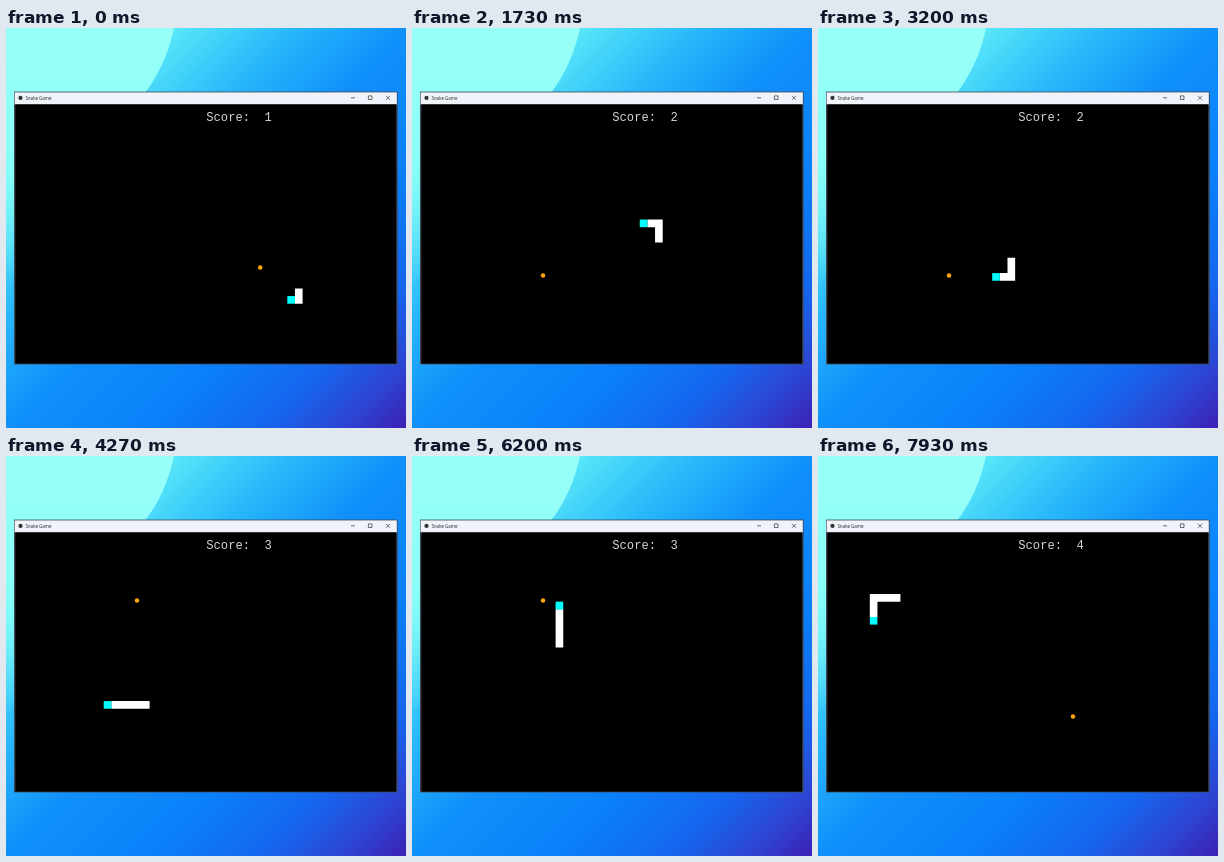
These frames come from a looping animation (400 px wide and 400 px high, 8 s). An HTML page:

```html
<!DOCTYPE html>
<html lang="en">
<head>
<meta charset="utf-8">
<title>Snake Game</title>
<style>
  html, body { margin: 0; width: 100%; height: 100%; overflow: hidden; }
  svg { display: block; width: 100vw; height: 100vh; }
  .title { font: 4.5px "Open Sans", "Noto Sans", sans-serif; fill: #222; }
  .score { font: 12.15px "Courier New", "Liberation Mono", monospace; fill: #d4d4d4; white-space: pre; }
  .controls { fill: none; stroke: #333; stroke-width: .7; }
</style>
</head>
<body>
<svg viewBox="0 0 400 400">
  <defs>
    <linearGradient id="sky" gradientUnits="userSpaceOnUse" x2="400" y2="400">
      <stop offset="0" stop-color="#8ffff8"/>
      <stop offset=".2" stop-color="#5ceaf8"/>
      <stop offset=".36" stop-color="#28b8fa"/>
      <stop offset=".5" stop-color="#1090fa"/>
      <stop offset=".68" stop-color="#0a80fa"/>
      <stop offset=".82" stop-color="#1566ee"/>
      <stop offset=".92" stop-color="#2d44d2"/>
      <stop offset="1" stop-color="#3c20b4"/>
    </linearGradient>
    <linearGradient id="glow" gradientUnits="userSpaceOnUse" x2="0" y2="260">
      <stop offset="0" stop-color="#98fff8"/>
      <stop offset=".5" stop-color="#8afff8"/>
      <stop offset="1" stop-color="#8afff8" stop-opacity="0"/>
    </linearGradient>
  </defs>

  <rect width="400" height="400" fill="url(#sky)"/>
  <path d="M0 0H168Q160 38 138 66L0 260Z" fill="url(#glow)"/>

  <rect x="8" y="63.6" width="383.6" height="272.8" fill="#3c4450"/>
  <rect x="8.6" y="64.4" width="382.2" height="12" fill="#f0f3fa"/>
  <rect x="9.4" y="76.4" width="380.8" height="259.2"/>
  <circle cx="14.5" cy="69.9" r="2.1" fill="#333"/>
  <text class="title" x="19.4" y="71.6">Snake Game</text>
  <path class="controls" d="M345 69.8h4M362.4 67.9h3.6v3.6h-3.6zM380 67.8l4 4m0-4l-4 4"/>

  <text class="score" id="score" x="200.3" y="93"></text>
  <circle id="food" r="2.25" fill="#ffa50a"/>
  <path id="body" fill="#fff"/>
  <path id="head" fill="#0ff"/>
</svg>
<script>
  const LOOP = 8000, FRAME = 200 / 3;
  const STEP = 104.5, LEAD = 76;
  const CELL = 7.65, LEFT = 51.8, TOP = 138;
  const TURNS = "L5 U10 L7 D7 L12 U6 R6 U8 L12 D3";
  const DIRS = { L: [-1, 0], R: [1, 0], U: [0, -1], D: [0, 1] };

  // Each meal: the move on which it is eaten, then the next food position.
  const MEALS = [
    { move: 0, food: [254.2, 239.4] },
    { move: 9, food: [131, 247.4] },
    { move: 37, food: [131, 144.6] },
    { move: 63, food: [255, 260.5] }
  ];

  const trail = [[31, 16], [31, 17], [30, 17]];
  const START = trail.length - 1;
  for (const turn of TURNS.split(" ")) {
    const [dx, dy] = DIRS[turn[0]];
    for (let i = 0; i < +turn.slice(1); i++) {
      const [x, y] = trail[trail.length - 1];
      trail.push([x + dx, y + dy]);
    }
  }

  const [score, food, body, head] =
    ["score", "food", "body", "head"].map(id => document.getElementById(id));

  function cellsPath(cells) {
    return cells.map(([x, y]) =>
      `M${LEFT + x * CELL} ${TOP + y * CELL}h${CELL}v${CELL}h${-CELL}z`).join("");
  }

  function draw(time) {
    const frame = Math.floor((time % LOOP + 4) / FRAME) % 120;
    const move = Math.min(Math.floor((frame * FRAME + LEAD) / STEP), trail.length - 1 - START);
    const eaten = MEALS.filter(meal => meal.move <= move);
    const meal = eaten[eaten.length - 1];

    // A new segment sits under the tail until the next move.
    const length = eaten.length + 3 - (move === meal.move ? 1 : 0);
    const end = START + move;
    body.setAttribute("d", cellsPath(trail.slice(end - length + 1, end)));
    head.setAttribute("d", cellsPath([trail[end]]));
    food.setAttribute("cx", meal.food[0]);
    food.setAttribute("cy", meal.food[1]);
    score.textContent = `Score:  ${eaten.length}`;
  }

  const began = performance.now();
  function tick() {
    draw(performance.now() - began);
    requestAnimationFrame(tick);
  }
  tick();
</script>
</body>
</html>
```
